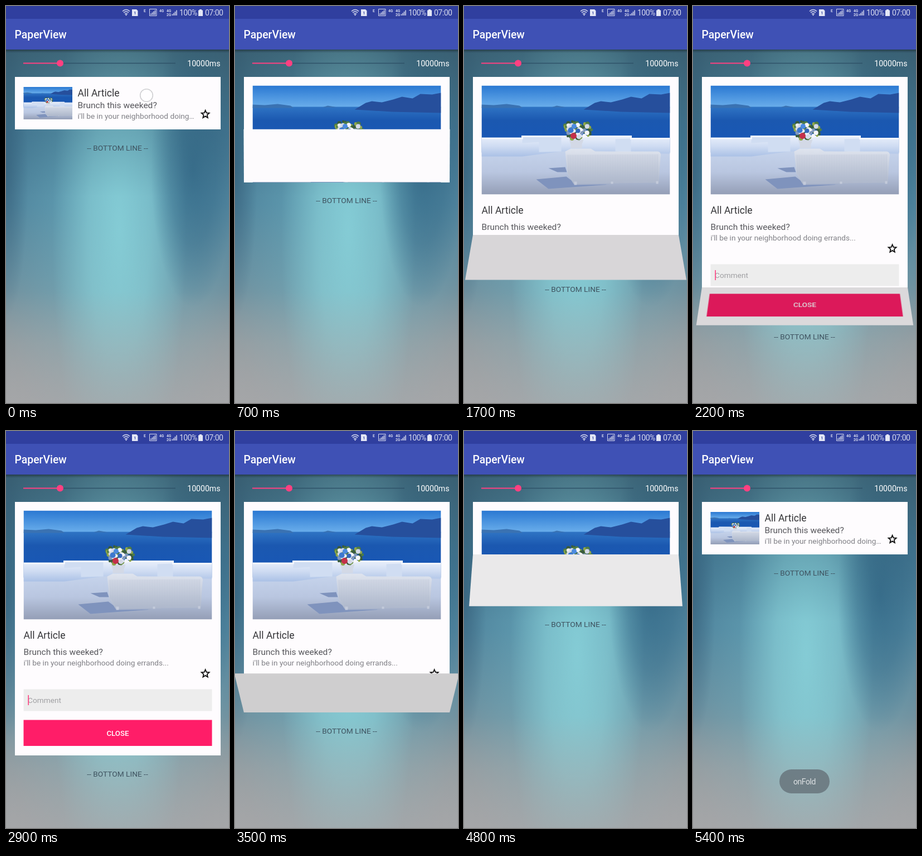
Write an HTML page that moves like this. It is 400 px wide and 711 px high and loops after 5.5 s.

```html
<!DOCTYPE html>
<html lang="en">
<head>
<meta charset="utf-8">
<title>PaperView</title>
<style>
  html, body { margin: 0; width: 100%; height: 100%; overflow: hidden; }
  body { position: relative; font-family: Roboto, sans-serif; }
  svg { display: block; }
  #stage {
    position: absolute; left: 0; top: 0; width: 400px; height: 711px; overflow: hidden;
    background:
      linear-gradient(180deg, rgba(48,82,100,.6) 11%, rgba(48,92,115,.25) 30%, transparent 48%),
      linear-gradient(180deg, transparent 72%, rgba(166,168,171,.75) 100%),
      radial-gradient(ellipse 75px 250px at 335px 290px, rgba(38,90,124,.6), rgba(38,90,124,.35) 55%, transparent),
      radial-gradient(ellipse 40px 260px at 0 300px, rgba(42,80,108,.5), transparent),
      radial-gradient(ellipse 120px 520px at 203px 400px, rgba(140,214,221,.8), rgba(140,212,219,.6) 45%, transparent),
      radial-gradient(ellipse 215px 560px at 200px 340px, rgba(112,182,198,.6), rgba(112,182,198,.35) 55%, transparent),
      linear-gradient(180deg, #47748a 11%, #447793 32%, #4f829b 50%, #6a8f9f 68%, #8c9a9f 85%, #a09f9f 100%);
  }
  #stage > * { position: absolute; }
  #card, .flap { left: 15.5px; width: 369px; overflow: hidden; background: #fefcfe; }
  #card { top: 127px; }
  .flap { height: 94.25px; }
  #last { height: 77px; }
  #line { left: 0; top: 0; }
  .h { font-size: 17.6px; fill: #333336; }
  .s { font-size: 15.55px; fill: #55555a; }
  .b { font-size: 13.7px; fill: #808086; }
  .bar { font-size: 14px; letter-spacing: -.5px; fill: #d5d9ee; }
  .tiny { font-size: 6.5px; font-weight: 700; fill: #d5d9ee; }
</style>
</head>
<body>
<div id="stage">
  <svg width="400" height="711">
    <defs>
      <linearGradient id="sky" x2="0" y2="1">
        <stop stop-color="#2a78d2"/><stop offset="1" stop-color="#6cb0ec"/>
      </linearGradient>
      <linearGradient id="sea" x2="0" y2="1">
        <stop stop-color="#2f74c4"/><stop offset=".3" stop-color="#1b58b0"/><stop offset="1" stop-color="#1757b8"/>
      </linearGradient>
      <linearGradient id="floor" x2="0" y2="1">
        <stop stop-color="#c6d4ec"/><stop offset=".5" stop-color="#b9c6e0"/><stop offset="1" stop-color="#949eb6"/>
      </linearGradient>
      <linearGradient id="wall" x2="0" y2="1">
        <stop stop-color="#eaf0fb"/><stop offset=".5" stop-color="#cfdcf2"/><stop offset="1" stop-color="#abc1e6"/>
      </linearGradient>
      <linearGradient id="sofa" x2="0" y2="1">
        <stop stop-color="#dfe4ee"/><stop offset=".4" stop-color="#ccd3e1"/><stop offset="1" stop-color="#adb7cb"/>
      </linearGradient>
      <linearGradient id="drop" x2="0" y2="1">
        <stop stop-opacity=".35"/><stop offset="1" stop-opacity="0"/>
      </linearGradient>
      <pattern id="weave" width="3" height="3" patternUnits="userSpaceOnUse">
        <path d="M0 0H1.2V3H0Z" fill="#a9b3c8"/>
      </pattern>
      <symbol id="star" viewBox="0 0 24 24">
        <path d="M12 4.1l2.1 5 5.4.4-4.1 3.6 1.2 5.3L12 15.600l-4.600 2.800 1.200-5.300-4.100-3.600 5.400-.4z"
          fill="none" stroke="#111" stroke-width="2"/>
      </symbol>
      <symbol id="photo" viewBox="0 0 338 195" preserveAspectRatio="xMidYMid slice">
        <path d="M0 0H338V40H0Z" fill="url(#sky)"/>
        <path d="M0 38H338V120H0Z" fill="url(#sea)"/>
        <path d="M0 34L22 35 45 33 68 36 74 40H0ZM125 39L135 36 152 39Z" fill="#3a72b2"/>
        <path d="M183 43L203 31 214 28 232 30 252 25 268 20 287 23 301 15 322 16 338 13V49L250 47Z" fill="#264f9c"/>
        <path d="M0 115H338V195H0Z" fill="url(#floor)"/>
        <path d="M0 94H73V90H143V91H268V95H338V122L268 121 205 117 143 118 73 127H0Z" fill="url(#wall)"/>
        <path d="M73 90V103L103 101V119L143 118V91ZM268 95V120L240 118V96Z" fill="#d0ddf2"/>
        <path d="M0 94.500H73V91H268V95H338" fill="none" stroke="#f4f7fd" stroke-width="3"/>
        <path d="M98 168L152 163 172 178 230 177 120 185ZM120 148L150 146 153 155 136 155Z" fill="#7f93bd"/>
        <path d="M150 118L160 113 196 113 204 118 316 118Q323 119 321 128L318 174 165 176 154 158Z" fill="url(#sofa)"/>
        <path d="M153 124L318 123 316 171 167 173 155 156Z" fill="url(#weave)" opacity=".45"/>
        <path d="M166 172V178H171V172ZM232 172V176H236V172ZM313 171V176H317V171Z" fill="#c3cada"/>
        <path d="M157 97H183L180 105V112H160V105Z" fill="#d3d9e6"/>
        <g id="bouquet"></g>
      </symbol>
    </defs>

    <path d="M0 78H400V84H0Z" fill="url(#drop)"/>
    <path d="M0 0H400V78H0Z" fill="#3f51b5"/>
    <path d="M0 0H400V23H0Z" fill="#303f9f"/>
    <text x="15.500" y="58" font-size="19.400" font-weight="500" fill="#fff">PaperView</text>

    <g fill="none" stroke="#d5d9ee" stroke-width="1.500">
      <path d="M209 9.500Q215.500 3.500 222 9.500M211 12Q215.500 8 220 12M213 14.500Q215.500 12.500 218 14.500"/>
      <path d="M257.500 5.500H270V17.500H257.500Z" stroke-width="1"/>
      <path d="M260 16V13.500M262.500 16V11.500M265 16V9.500M267.500 16V7.500"/>
      <path d="M298.500 17V14.500M301 17V12.500M303.500 17V10M306 17V7.500"/>
    </g>
    <circle cx="215.500" cy="16" r="1.200" fill="#d5d9ee"/>
    <path d="M226 6H234L236.500 8.500V18H226ZM347 6H351V7.500H353V18H345V7.500H347Z" fill="#e3e6f5"/>
    <text class="tiny" x="229.500" y="15" style="fill:#303f9f">1</text>
    <text class="tiny" x="247" y="11">E</text>
    <text class="tiny" x="275" y="11">4G</text>
    <text class="tiny" x="288" y="11">4G</text>
    <text class="tiny" x="288" y="18">2G</text>
    <text class="bar" x="311" y="17">100%</text>
    <text class="bar" x="357" y="17">07:00</text>

    <path d="M97 102.500H304" stroke="#2f5268" stroke-width="1.600"/>
    <path d="M31 102.500H97" stroke="#ff4081" stroke-width="2"/>
    <circle cx="97" cy="102.500" r="6" fill="#ff4081"/>
    <text x="384.500" y="108" text-anchor="end" font-size="14.100" fill="#fff">10000ms</text>
  </svg>

  <svg id="line" width="400" height="50">
    <text x="200" y="38" text-anchor="middle" font-size="13.700" fill="#3f5360">-- BOTTOM LINE --</text>
  </svg>

  <div id="card">
    <svg width="369" height="377" viewBox="15.5 127 369 377">
      <use href="#photo" x="31" y="142.500" width="338" height="195"/>
      <text class="h" x="31" y="371.500">All Article</text>
      <text class="s" x="31" y="401">Brunch this weeked?</text>
      <text class="b" x="31" y="420">i'll be in your neighborhood doing errands...</text>
      <use href="#star" x="346" y="423.500" width="22.200" height="22.200"/>
      <path d="M31 462.500H369V501.500H31Z" fill="#ededed"/>
      <text class="b" x="38.500" y="487" style="fill:#a0a0a3">Comment</text>
      <path d="M39.700 473V491" stroke="#ff4081" stroke-width="1.600"/>
    </svg>
  </div>

  <div class="flap" id="blank"></div>
  <div class="flap" id="last">
    <svg width="369" height="77" viewBox="15.5 504 369 77">
      <path d="M31 517.500H369V564H31Z" fill="#ff1d68"/>
      <text x="200" y="545.500" text-anchor="middle" font-size="13.300" font-weight="500" fill="#fff">CLOSE</text>
    </svg>
  </div>
  <div class="flap" id="cover">
    <svg width="369" height="94.250" viewBox="15.5 127 369 94.25">
      <use href="#photo" x="31" y="145" width="87.500" height="58"/>
      <text class="h" x="128" y="161.500">All Article</text>
      <text class="s" x="128" y="183">Brunch this weeked?</text>
      <text class="b" x="128" y="202">i'll be in your neighborhood doing…</text>
      <use href="#star" x="346" y="183" width="22.200" height="22.200"/>
    </svg>
  </div>

  <svg width="400" height="711">
    <circle id="touch" cx="252" cy="160" r="11.300" fill="#fff" fill-opacity=".5" stroke="#cfcfd2" stroke-width="1.600"/>
    <g id="toast">
      <rect x="155" y="606" width="90" height="43" rx="21.500" fill="#6c7a82" fill-opacity=".93"/>
      <text x="200" y="633" text-anchor="middle" font-size="14" letter-spacing="-.4" fill="#dde1e3">onFold</text>
    </g>
  </svg>
</div>

<script>
  const $ = id => document.getElementById(id);
  const LOOP = 5500, FRAME = 100;
  const TOP = 127, PANEL = 94.25, LAST = 77, DEPTH = 810;
  const FLIP = 560, LAST_FLIP = 472, TOTAL = 3 * FLIP + LAST_FLIP;
  const OPEN_AT = 136, CLOSE_AT = 3152;
  const flaps = [$('cover'), $('blank'), $('last')];
  const start = performance.now();

  // Bouquet: leaves first, then blossoms scattered over a dome.
  let seed = 7;
  const rand = () => (seed = seed * 16807 % 2147483647) / 2147483647;
  const blob = (x, y, r, fill) => `<circle cx="${x}" cy="${y}" r="${r}" fill="${fill}"/>`;
  function scatter(n, rx, ry, r, colors) {
    let out = '';
    for (let i = 0; i < n; i++) {
      const a = rand() * 2 * Math.PI, d = Math.sqrt(rand());
      out += blob((172 + rx * d * Math.cos(a)).toFixed(1), (79 + ry * d * Math.sin(a)).toFixed(1),
        r * (.7 + .6 * rand()), colors[i % colors.length]);
    }
    return out;
  }
  $('bouquet').innerHTML =
    scatter(60, 26, 17, 3, ['#4f7d45', '#8fa64a', '#3a5c3c']) +
    scatter(26, 22, 14, 3.4, ['#eceef4', '#d5dae8', '#f6f6fa', '#7f97bd']) +
    blob(160, 80, 5, '#3d78cf') + blob(166, 73, 4.5, '#4c8be0') + blob(173, 81, 4, '#3568bb') +
    blob(165, 90, 5.5, '#c3304a');

  const clamp = (v, lo, hi) => Math.min(hi, Math.max(lo, v));

  // Fold state at time t: hinge position and flap angle (180 folded, 0 flat).
  function foldAt(t) {
    const u = clamp(t < CLOSE_AT ? t - OPEN_AT : TOTAL - (t - CLOSE_AT), 0, TOTAL);
    const k = Math.min(3, Math.floor(u / FLIP));
    const p = (u - k * FLIP) / (k < 3 ? FLIP : LAST_FLIP);
    return { k, hinge: TOP + PANEL * (k + 1), angle: 180 * (1 - p) };
  }

  function bottomAt(t) {
    const { k, hinge, angle } = foldAt(t);
    const size = k < 3 ? PANEL : LAST;
    return hinge + size * Math.max(0, Math.cos(angle * Math.PI / 180));
  }

  function render(t) {
    const { k, hinge, angle } = foldAt(t);
    const up = angle > 90;
    const flap = up && k === 0 ? $('cover') : !up && k === 3 ? $('last') : $('blank');
    for (const f of flaps) f.style.visibility = f === flap ? 'visible' : 'hidden';

    flap.style.top = (up ? hinge - PANEL : hinge) + 'px';
    flap.style.transformOrigin = up ? '50% 100%' : '50% 0';
    flap.style.transform = `perspective(${DEPTH}px) rotateX(${up ? angle - 180 : angle}deg)`;
    flap.style.filter = `brightness(${1 - .25 * Math.sin(angle * Math.PI / 180)})`;

    $('card').style.height = hinge - TOP + 'px';
    // The layout trails the flap slightly.
    const lag = t < CLOSE_AT ? 29 : 15;
    $('line').style.transform = `translateY(${bottomAt(t - lag)}px)`;
    $('touch').style.opacity = t < FRAME ? 1 : 0;
    $('toast').style.opacity = t >= 5340 ? 1 : 0;
  }

  function tick() {
    const t = (performance.now() - start + 5) % LOOP;
    render(Math.floor(t / FRAME) * FRAME);
    requestAnimationFrame(tick);
  }
  tick();
</script>
</body>
</html>
```
